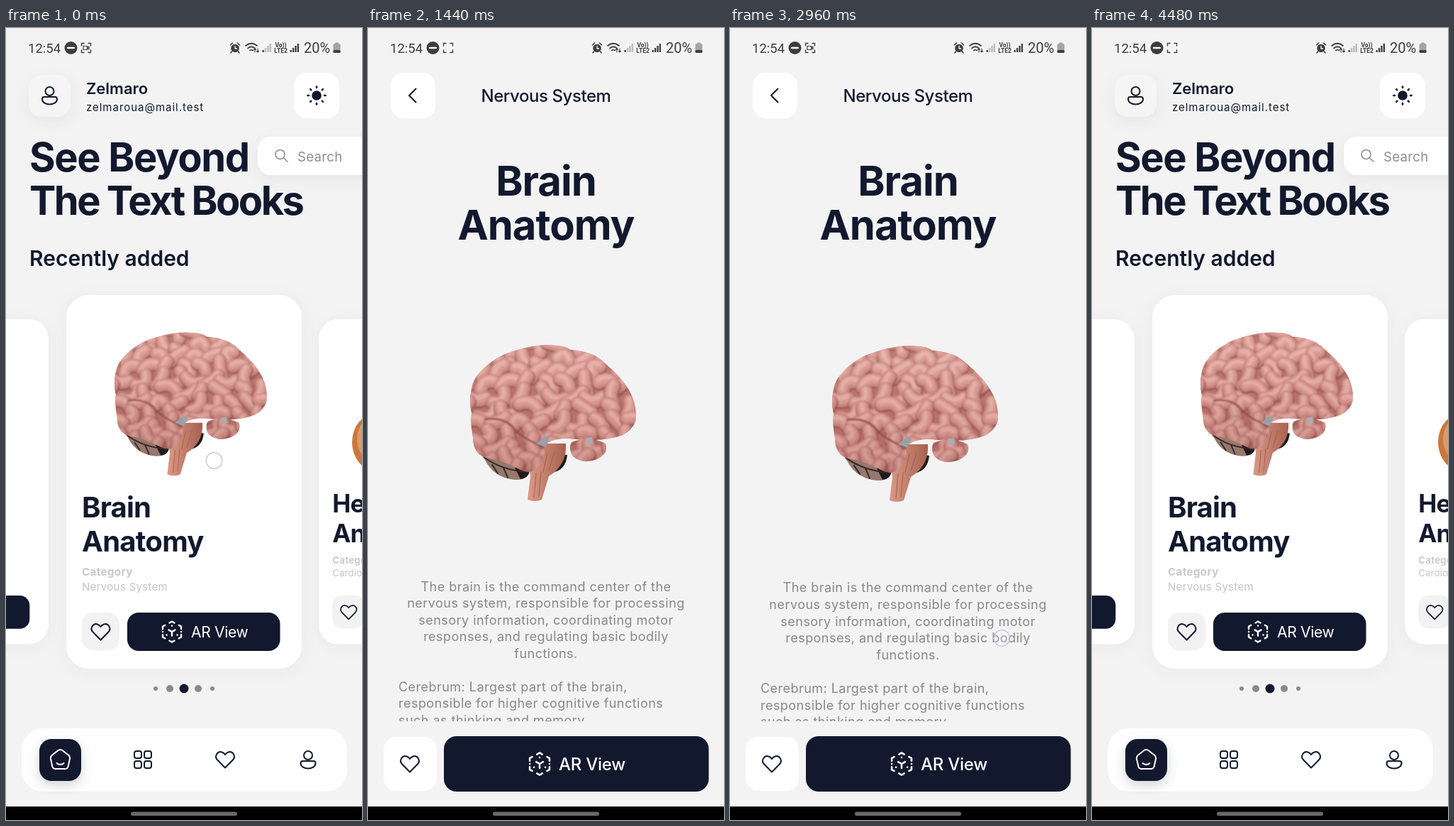
These frames come from a looping animation (502x1115 px, 4560 ms). An HTML page:

```html
<!DOCTYPE html>
<html lang="en">
<head>
<meta charset="utf-8">
<title>Anatomy app</title>
<style>
html, body { margin: 0; width: 100%; height: 100%; overflow: hidden; background: #f3f3f3; }
svg { display: block; width: 100vw; height: 100vh; font-family: Inter, sans-serif; }
.soft { filter: drop-shadow(0 6px 10px #1a1f3a10); }
</style>
</head>
<body>
<svg id="stage" viewBox="0 0 502 1115"></svg>
<script>
const LOOP = 4560, NAVY = '#12192e', BG = '#f3f3f3', SCROLL = 174;

// Drawing helpers
const text = (x, y, size, weight, s, { fill = NAVY, gap = 0, anchor = 'start', font = '' } = {}) =>
  `<text x="${x}" y="${y}" font-size="${size}" font-weight="${weight}" fill="${fill}" letter-spacing="${gap}em" text-anchor="${anchor}" ${font && `font-family="${font}"`}>${s}</text>`;
const box = (x, y, w, h, r, fill, more = '') =>
  `<rect x="${x}" y="${y}" width="${w}" height="${h}" rx="${r}" fill="${fill}" ${more}/>`;
const dot = (x, y, r, fill, more = '') => `<circle cx="${x}" cy="${y}" r="${r}" fill="${fill}" ${more}/>`;
const group = (id, body, more = '') => `<g id="${id}" ${more}>${body}</g>`;
const icon = (d, x, y, color = NAVY, k = 1, width = 2) =>
  `<path d="${d}" transform="translate(${x} ${y}) scale(${k})" fill="none" stroke="${color}" stroke-width="${width}" stroke-linecap="round" stroke-linejoin="round"/>`;

const HEART = 'M0 11.5L-10.8 .5C-16 -5 -10.5 -12.5 -4.5 -10.5Q-1.5 -9.5 0 -7Q1.5 -9.5 4.5 -10.5C10.5 -12.5 16 -5 10.8 .5Z';
const PERSON = 'M-6 -6a6 6 0 1 0 12 0a6 6 0 1 0 -12 0M-10.5 5Q-10.5 2 -7.5 2H7.5Q10.5 2 10.5 5C10.5 10 5 12.5 0 12.5S-10.5 10 -10.5 5Z';
const CHEVRON = 'M5 -9.5L-4.5 0L5 9.5';
const HOUSE = 'M-3 -13Q0 -15 3 -13L12 -6Q14 -4 13.5 -1L11 10Q10 13 7 13H-7Q-10 13 -11 10L-13.5 -1Q-14 -4 -12 -6ZM-5 5Q0 9 5 5';
const CUBE = 'M-3.5 -12.5L0 -14.5L3.5 -12.5M-3.5 12.5L0 14.5L3.5 12.5M-13 -4V-7.5L-9.8 -9.3M13 -4V-7.5L9.8 -9.3M-13 4V7.5L-9.8 9.3M13 4V7.5L9.8 9.3M0 5.5V0L-4.5 -2.6M0 0L4.5 -2.6M-13 0h.1M13 0h.1M0 -8.5v.1M-7.5 4.5h.1M7.5 4.5h.1';
const LENS = 'M-8 -2a6.5 6.5 0 1 0 13 0a6.5 6.5 0 1 0 -13 0M3.5 3L9 8';

let seed = 11;
const rnd = () => (seed = seed * 16807 % 2147483647) / 2147483647;

// The brain lives in a 235 x 219 box
function brain() {
  const shape = 'M5 53C14 32 40 14 62 8Q95 -3 122 0Q135 0 142 6Q175 8 190 24Q212 42 222 58Q236 78 235 103Q232 118 216 126Q190 136 150 132Q120 128 106 140Q108 160 94 174Q84 182 70 174Q48 162 20 157Q5 150 5 130Q1 110 3 95Q-2 75 5 53Z' +
    'M144 136Q170 126 192 138Q197 152 180 160Q160 168 146 156Q139 146 144 136Z';
  let folds = '';
  for (let y = 0; y < 185; y += 18)
    for (let x = y % 36 ? -4 : 10; x < 245; x += 28) {
      const a = (y > 105 && x < 110 ? .6 : (x - 110) / 160) + (rnd() - .5) * 2.6;
      const len = 7 + rnd() * 9, bend = (rnd() - .5) * 34;
      const dx = Math.cos(a) * len, dy = Math.sin(a) * len;
      const px = x + rnd() * 9 - 4, py = y + rnd() * 8 - 4;
      const d = `M${px - dx} ${py - dy}Q${px - Math.sin(a) * bend} ${py + Math.cos(a) * bend} ${px + dx} ${py + dy}`;
      folds += icon(d, .5, 1.5, '#98544f', 1, 21) + icon(d, 0, 0, '#c98981', 1, 18.5) +
        icon(d, -.5, -1.5, '#d99b94', 1, 13) + icon(d, -1, -3, '#e6b0a8', 1, 6);
    }
  return `<defs>
    <clipPath id="lobes"><path d="${shape}"/></clipPath>
    <filter id="smooth"><feGaussianBlur stdDeviation="1"/></filter>
    <linearGradient id="shade" x1=".45" y1="0" x2=".4" y2="1">
      <stop offset="0" stop-color="#ffd9d0" stop-opacity=".1"/><stop offset=".5" stop-color="#b86a64" stop-opacity=".08"/><stop offset="1" stop-color="#7a3530" stop-opacity=".25"/>
    </linearGradient>
    <linearGradient id="stem"><stop offset="0" stop-color="#d99a86"/><stop offset="1" stop-color="#a8604f"/></linearGradient>
  </defs>
  <path d="M18 152Q50 158 84 172Q86 190 64 189Q30 186 18 152Z" fill="#96786c"/>
  <path d="M64 172L84 168Q88 186 72 188ZM118 152L138 154Q136 176 116 179Z" fill="#211b1b"/>
  ${icon('M20 157Q46 176 82 178M32 168L40 180M48 172L54 186', 0, 0, '#332825')}
  <path d="M84 172Q104 150 104 138H136Q138 168 112 184L102 217Q92 221 82 217L86 184Z" fill="url(#stem)"/>
  ${icon('M94 180L91 214M101 178L98 212M110 152L104 178M120 150L112 176', 0, 0, '#a65d4d', 1, 1)}
  <g clip-path="url(#lobes)"><path d="${shape}" fill="#b9746d"/>
    <g filter="url(#smooth)">${folds}${icon('M22 104Q48 100 62 116T104 142', 0, 0, '#8a4844', 1, 2.5)}</g>
    <path d="${shape}" fill="url(#shade)"/></g>
  <path d="M94 138L107 127L113 130L107 143Z" fill="#9aa0a8"/>
  <path d="M164 131L173 129L174 138L167 140Z" fill="#a9acb4"/>`;
}

function card(x, y, k, title, system, picture = '') {
  return `<g transform="translate(${x} ${y}) scale(${k})">` +
    box(0, 0, 332, 526, 32, '#fff', 'style="filter:drop-shadow(0 4px 12px #1a1f3a0a)"') + picture +
    text(22, 313, 40, 700, title, { gap: -.02 }) + text(22, 361, 40, 700, 'Anatomy', { gap: -.018 }) +
    text(22, 395, 15, 700, 'Category', { fill: '#c9c9cb', gap: .03 }) +
    text(22, 416, 15, 400, system, { fill: '#c4c4c6', gap: .02 }) +
    box(22, 447, 53, 53, 16, '#f2f2f3') + icon(HEART, 48.5, 474) +
    box(86, 447, 215.5, 54, 16, NAVY) + icon(CUBE, 149, 474, '#fff', 1, 2.4) +
    text(176, 482, 21, 400, 'AR View', { fill: '#fff', gap: -.015 }) + '</g>';
}

function home() {
  let rays = '', dots = '', tiles = '';
  for (let i = 0; i < 8; i++) {
    const c = Math.cos(i * Math.PI / 4), s = Math.sin(i * Math.PI / 4);
    rays += `M${c * 11} ${s * 11}L${c * 12.5} ${s * 12.5}`;
  }
  [3, 5, 6.5, 5, 3].forEach((r, i) => dots += dot(211 + i * 20, 930, r, i == 2 ? NAVY : '#8a8a8c'));
  for (const x of [181, 195]) for (const y of [1018, 1032])
    tiles += box(x, y, 10, 10, 3, 'none', `stroke="${NAVY}" stroke-width="2"`);
  const organ = `<ellipse cx="92" cy="199" rx="38" ry="46" fill="#c9783f"/><ellipse cx="96" cy="194" rx="34" ry="39" fill="#e09a62"/>`;
  return box(-20, -20, 542, 1150, 0, BG) +
    box(32, 66, 59, 59, 18, '#f5f5f5', 'class="soft"') + icon(PERSON, 61.5, 95) +
    text(113, 93, 22, 600, 'Zelmaro') + text(113, 117, 15, 400, 'zelmaroua@mail.test', { gap: .065 }) +
    box(406, 63, 64, 64, 18, '#fff') + dot(438, 95, 6.8, NAVY) + icon(rays, 438, 95, NAVY, 1, 2.6) +
    text(33, 202, 56, 700, 'See Beyond', { gap: -.024 }) +
    text(33, 263, 56, 700, 'The Text Books', { gap: -.045 }) +
    box(355, 153, 200, 54, 18, '#fff', 'class="soft"') + icon(LENS, 388, 180, '#8e8e90', 1, 1.6) +
    text(411, 188, 18.5, 400, 'Search', { fill: '#8e8e90', gap: .02 }) +
    text(33, 335, 30, 600, 'Recently added') +
    card(-229, 410, .87, 'Lungs', 'Respiratory System') +
    card(441, 410, .87, 'Heart', 'Cardiovascular System', organ) +
    card(85, 376, 1, 'Brain', 'Nervous System') + dots +
    box(22, 986, 459, 89, 30, '#fff') +
    box(47, 1001, 59, 59, 17, NAVY, 'style="filter:drop-shadow(0 6px 8px #12193030)"') + icon(HOUSE, 76.5, 1030, '#fff') +
    tiles + icon(HEART, 309, 1030) + icon(PERSON, 426, 1030);
}

function detail() {
  const intro = ['The brain is the command center of the', 'nervous system, responsible for processing',
    'sensory information, coordinating motor', 'responses, and regulating basic bodily', 'functions.'];
  const parts = ['Cerebrum: Largest part of the brain,', 'responsible for higher cognitive functions',
    'such as thinking and memory.', '', 'Cerebellum: Located below the cerebrum,', 'involved in coordination and balance.', '',
    'Brainstem: Connects the brain to the spinal', 'cord and regulates basic functions like', 'breathing and heartbeat.'];
  const row = i => 792.5 + i * 23.55;
  const style = { fill: '#88888a', gap: .026 };
  const copy = intro.map((s, i) => text(251, row(i), 18, 400, s, { ...style, anchor: 'middle' })).join('') +
    parts.map((s, i) => text(43, row(i + 6), 18, 400, s, style)).join('');
  const mid = { anchor: 'middle', gap: -.018 };
  return box(0, 0, 502, 1096, 0, BG) +
    group('back', box(32, 63, 63, 64, 18, '#fff') + icon(CHEVRON, 62.5, 95)) +
    group('system', text(251, 104, 24, 500, 'Nervous System', mid)) +
    `<clipPath id="view"><rect y="138" width="502" height="838"/></clipPath>` +
    `<g clip-path="url(#view)">` + group('scroller',
      group('title', text(251, 236, 58, 700, 'Brain', mid) + text(251, 298, 58, 700, 'Anatomy', mid)) +
      group('copy', copy)) + '</g>' +
    group('actions', box(22, 998, 75, 76, 18, '#fff') + icon(HEART, 59, 1036) +
      box(107, 997, 373.5, 78, 18, NAVY) + icon(CUBE, 242, 1036, '#fff', 1.07, 2.4) +
      text(269, 1045, 24, 500, 'AR View', { fill: '#fff', gap: -.01 }));
}

function system() {
  const ink = '#3d3d3f', font = 'Roboto, sans-serif';
  let bars = '';
  for (let i = 0; i < 4; i++)
    bars += box(361.5 + i * 3.4, 31 - i * 3, 2.3, 3 + i * 3, .5, i ? '#b9b9bb' : ink) + box(400.5 + i * 3.4, 31 - i * 3, 2.3, 3 + i * 3, .5, ink);
  return text(31, 34.5, 18.5, 400, '12:54', { fill: ink, font }) +
    dot(91.5, 28, 9, ink) + box(86, 26.7, 11, 2.6, 1, '#fff') +
    icon('M-6.5 -3V-6.5H-3M3 -6.5H6.5V-3M6.5 3V6.5H3M-3 6.5H-6.5V3', 113, 28, ink, 1, 1.4) +
    group('camera', icon('M-4 -2.5H1.5V2.5H-4ZM1.5 0L4 -2V2Z', 113, 28, ink, 1, 1.2)) +
    dot(323, 28.5, 5.8, ink) + icon('M0 -3V.5H2.5', 323, 28.5, '#fff', 1, 1.3) + icon('M-6.5 -4L-3.5 -7M6.5 -4L3.5 -7M-4.5 5L-6 7M4.5 5L6 7', 323, 28, ink, 1, 1.6) +
    icon('M-8 -3Q0 -9.5 8 -3M-5 .5Q0 -4 5 .5M-2.2 3.5Q0 2 2.2 3.5', 346, 28, ink, 1, 1.7) + icon('M5 6V1M3.5 2.5L5 1L6.5 2.5M9 1V6M7.5 4.5L9 6L10.5 4.5', 346, 28, ink, 1, 1.1) +
    bars + text(387.5, 27, 8.5, 700, 'Vo))', { fill: ink, anchor: 'middle', font }) + text(387.5, 35, 8.5, 700, 'LTE2', { fill: ink, anchor: 'middle', font }) +
    text(420, 34.5, 20, 400, '20%', { fill: ink, font }) +
    box(461.5, 22, 10, 13, 2, '#a5a5a7') + box(464, 20.5, 5, 3, 1, '#a5a5a7') + box(461.5, 31, 10, 4, 1.5, ink) +
    box(0, 1096, 502, 19, 0, '#000') + box(176, 1103.5, 150, 5.5, 2.75, '#6a6a6a');
}

document.getElementById('stage').innerHTML =
  group('home', home()) + group('detail', detail()) + group('brain', brain()) +
  group('bubble', dot(0, 0, 29, '#a8a8a9') + icon(CHEVRON, 0, 0, '#fff', 1, 2.4)) +
  group('touch', dot(0, 0, 11.3, '#ffffff30', 'stroke="#b9c3e6" stroke-width="1.3"')) + system();

// Motion helpers
const el = id => document.getElementById(id);
const span = (t, a, b) => Math.min(1, Math.max(0, (t - a) / (b - a)));
const mix = (a, b, p) => a + (b - a) * p;
const out = (u, power = 2) => 1 - (1 - u) ** power;
const inOut = u => u < .5 ? 4 * u ** 3 : 1 - 4 * (1 - u) ** 3;
const move = (id, x, y, more = '') => el(id).setAttribute('transform', `translate(${x} ${y}) ${more}`);
const zoom = (id, k) => move(id, 251, 548, `scale(${k}) translate(-251 -548)`);
const fade = (id, o) => el(id).setAttribute('opacity', o);

function enter(id, t, start, dx, dy) {
  const p = out(span(t, start, start + 700));
  move(id, dx * (1 - p), dy * (1 - p));
  fade(id, Math.min(1, p * 1.3));
}

// [start, end, from x, from y, to x, to y]
const touches = [
  [0, 140, 293.5, 609, 293.5, 609],
  [1480, 1720, 372, 850, 380, 620],
  [2580, 3000, 376, 640, 383.5, 864],
  [3380, 3630, 500, 698, 406, 706]
];

function draw(t) {
  const push = span(t, 120, 420), pop = span(t, 3520, 3820);
  const leave = out(pop, 1.45), opening = t < 2000;
  zoom('home', opening ? 1 + .05 * out(push) : 1.1 - .1 * leave);
  zoom('detail', opening ? mix(.85, 1, out(push, 3)) : 1 - .1 * leave);
  fade('detail', opening ? Math.min(1, push * 2) : Math.max(0, 1 - pop * 1.7));

  enter('back', t, 262, -100, 0);
  enter('system', t, 262, 100, 0);
  enter('title', t, 314, -100, 0);
  enter('copy', t, 355, 0, 100);
  enter('actions', t, 402, 100, 0);

  const scroll = SCROLL * (out(span(t, 1500, 1880)) - inOut(span(t, 2600, 2900)));
  const stretch = 1 + .003 * span(t, 2860, 2940) * (1 - span(t, 2980, 3080));
  move('scroller', 0, 138 - scroll, `scale(1 ${stretch}) translate(0 -138)`);

  const hero = inOut(push) - inOut(pop);
  const top = 138 + (447 - 138) * stretch - scroll;
  move('brain', mix(152, 143, hero), mix(429, top, hero), `scale(${mix(.919, 1, hero)})`);

  const shown = out(span(t, 3400, 3520)) - span(t, 3630, 3760);
  move('bubble', mix(533, 474.5, shown), 613);

  const touch = touches.find(([a, b]) => t >= a && t < b);
  fade('touch', touch ? 1 : 0);
  if (touch) {
    const [a, b, x0, y0, x1, y1] = touch, p = out(span(t, a, b), 1.6);
    move('touch', mix(x0, x1, p), mix(y0, y1, p));
  }
  const beat = t % 1000;
  fade('camera', beat >= 100 && beat < 520 ? 0 : 1);
}

const begin = performance.now();
function tick() {
  draw((performance.now() - begin) % LOOP);
  requestAnimationFrame(tick);
}
tick();
</script>
</body>
</html>
```
